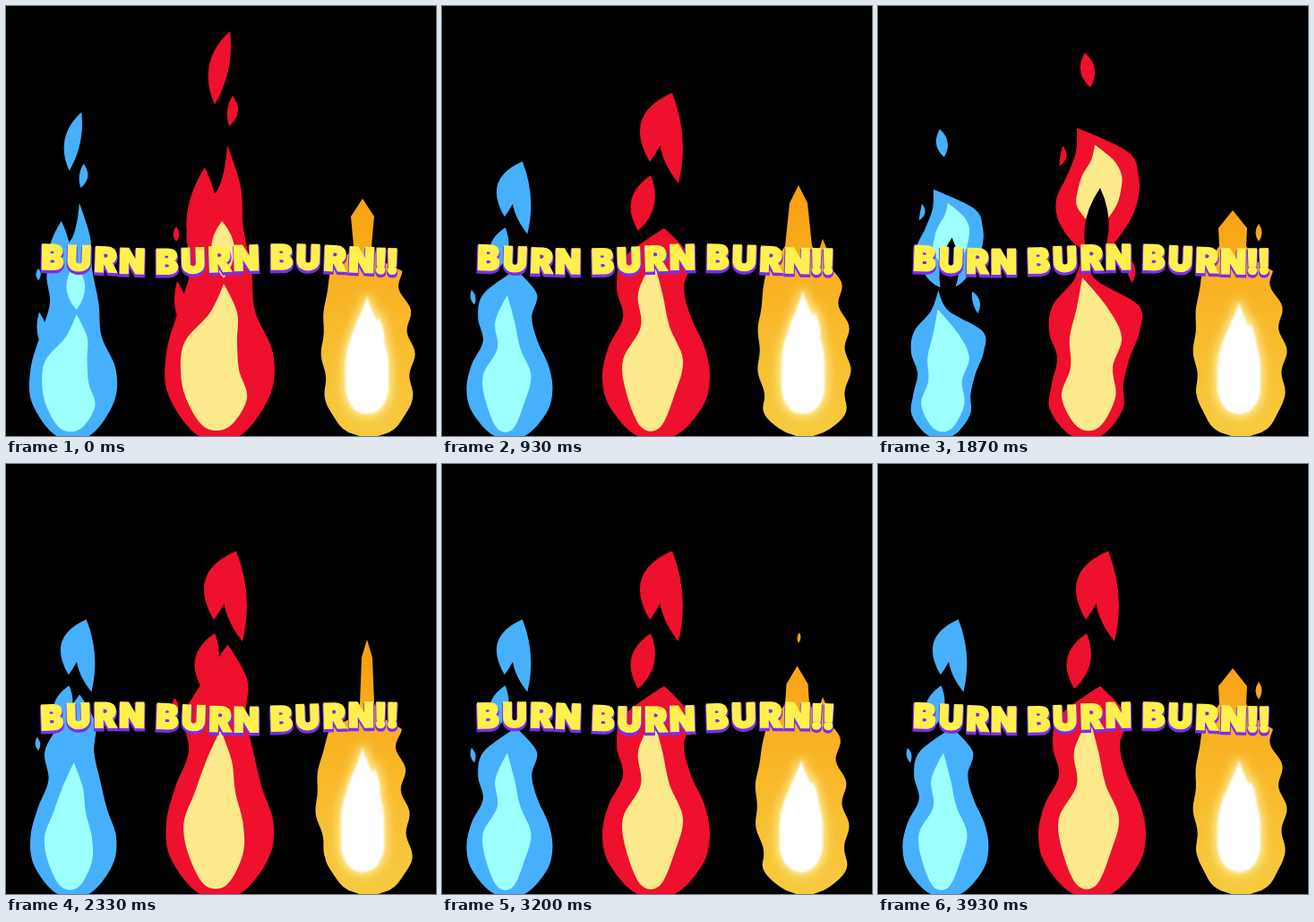
An HTML page that plays this animation: 480 by 480 pixels, repeating every 3.99 s.

```html
<!DOCTYPE html>
<html lang="en">
<head>
<meta charset="utf-8">
<title>Burn</title>
<style>
  html, body { margin: 0; width: 100%; height: 100%; overflow: hidden; background: #000; }
  svg { display: block; width: 100%; height: 100%; }
  text { font: 900 37px Inter, "Open Sans", sans-serif; text-anchor: middle; }
</style>
</head>
<body>
<svg viewBox="0 0 480 480">
  <defs>
    <linearGradient id="amber" gradientUnits="userSpaceOnUse" x1="0" y1="210" x2="0" y2="480">
      <stop offset="0" stop-color="#f8a012"/>
      <stop offset=".5" stop-color="#f9b829"/>
      <stop offset="1" stop-color="#f6cb40"/>
    </linearGradient>
    <filter id="soft" x="-50%" y="-50%" width="200%" height="200%">
      <feGaussianBlur stdDeviation="6"/>
    </filter>
    <filter id="edge"><feGaussianBlur stdDeviation="1.2"/></filter>
  </defs>
  <g transform="translate(-115.8 96) scale(.8)">
    <path class="outer" fill="#47b0fd"/><path class="core" fill="#9dfffe"/><path class="gap"/>
  </g>
  <g>
    <path class="outer" fill="#ee102c"/><path class="core" fill="#fce98b"/><path class="gap"/>
  </g>
  <path id="torch" fill="url(#amber)"/>
  <path class="heart" fill="#fff1a0" stroke="#fff1a0" stroke-width="6" filter="url(#soft)"/>
  <path class="heart" fill="#fff" filter="url(#edge)"/>
  <g id="words"></g>
</svg>
<script>
const NS = 'http://www.w3.org/2000/svg';
const FRAMES = 60, LOOP = 3990;

// Pointed lens from one end to the other; a positive bend bows it to the left.
function leaf([x1, y1, x2, y2, width, bend]) {
  const dx = x2 - x1, dy = y2 - y1, length = Math.hypot(dx, dy);
  const control = side => {
    const k = (2 * bend + side * width) / length;
    return `${(x1 + x2) / 2 - dy * k},${(y1 + y2) / 2 + dx * k}`;
  };
  return `M${x1},${y1}Q${control(-1)} ${x2},${y2}Q${control(1)} ${x1},${y1}Z`;
}

// Smooth flame: a tip, a base height and [left, right] edges evenly spaced between them.
function blob([x, y, base, ...edges]) {
  const rows = edges.length / 2, left = [], right = [];
  for (let i = 0; i < rows; i++) {
    const rowY = y + (base - y) * (i + 1) / (rows + 1);
    left.unshift([edges[2 * i], rowY]);
    right.push([edges[2 * i + 1], rowY]);
  }
  const l = left[0][0], r = right[rows - 1][0], inset = (r - l) * .3;
  const points = [[x, y], ...right, [r - inset, base], [l + inset, base], ...left];
  const at = i => points[(i + points.length) % points.length];
  const handle = (i, sign) => at(i).map((v, axis) =>
    at(i) === points[0] ? v : v + sign * (at(i + 1)[axis] - at(i - 1)[axis]) / 6);
  return `M${x},${y}` + points.map((_, i) =>
    `C${handle(i, 1)} ${handle(i + 1, -1)} ${at(i + 1)}`).join('') + 'Z';
}

const draw = part => part.length === 6 ? leaf(part) : blob(part);

// Shared parts meet in the middle, the rest come from the later pose.
const between = (a, b) => Object.fromEntries(Object.entries(b).map(([name, part]) =>
  [name, a[name] ? part.map((v, i) => (v + a[name][i]) / 2) : part]));

const tall = {
  body: [247, 155, 480, 238, 262, 203, 265, 206, 274, 192, 278, 179, 298, 181, 295],
  core: [243, 310, 470, 228, 258, 200, 258, 195, 260, 201, 269],
  coreBead: [241, 240, 243, 304, 26, 0],
  wisp: [250, 28, 233, 110, 22, 4],
  chip: [253, 100, 249, 134, 12, -2],
  fleck: [190, 246, 190, 263, 7, 0],
  tongue: [222, 180, 215, 300, 34, 0],
  lip: [191, 307, 200, 365, 14, 0]
};
const pinched = {
  body: [248, 248, 480, 203, 277, 195, 270, 202, 278, 186, 293, 179, 299, 187, 291],
  core: [236, 283, 470, 219, 246, 222, 254, 202, 269, 206, 260],
  crown: [257, 97, 264, 198, 26, 5],
  crownLobe: [257, 97, 232, 174, 30, 8],
  scrap: [233, 189, 219, 251, 26, 2],
  fleck: [186, 276, 190, 297, 7, 0]
};
const squat = {
  body: [229, 276, 480, 219, 243, 195, 291, 191, 292, 200, 281, 194, 274, 192, 273],
  core: [228, 303, 470, 222, 256, 214, 272, 215, 262, 205, 265],
  cloud: [222, 136, 270, 221, 279, 211, 291, 199, 290, 203, 279],
  coreCloud: [242, 155, 240, 238, 263, 228, 272, 223, 271, 222, 266],
  gap: [248, 203, 240, 297, 27, 0],
  dot: [231, 52, 237, 91, 16, 0],
  chip: [276, 278, 284, 309, 10, -2],
  fleck: [206, 156, 202, 179, 7, -3]
};
const forked = {
  body: [224, 240, 480, 219, 247, 219, 269, 207, 290, 193, 291, 187, 284, 194, 287],
  core: [238, 298, 470, 231, 248, 217, 273, 206, 271, 208, 275],
  coreSpike: [267, 342, 262, 410, 18, -2],
  cloud: [249, 122, 224, 228, 248, 217, 270, 215, 280, 220, 273],
  coreCloud: [233, 153, 215, 237, 249, 238, 260, 234, 263, 233, 260],
  gap: [250, 181, 232, 246, 26, 0],
  dot: [225, 46, 228, 67, 9, 0],
  chip: [274, 264, 275, 288, 8, 0],
  fleck: [208, 300, 187, 357, 16, 8]
};
const rising = {
  body: [231, 203, 480, 227, 256, 200, 286, 210, 282, 202, 281, 193, 301, 188, 302],
  core: [243, 261, 470, 230, 256, 239, 253, 219, 271, 202, 279],
  wisp: [245, 85, 243, 181, 26, 6],
  chip: [260, 148, 266, 208, 13, -5],
  fleck: [186, 290, 189, 324, 9, 3],
  tongue: [262, 216, 258, 290, 24, -2],
  lip: [198, 335, 205, 385, 12, 0]
};
const flames = [tall, between(tall, pinched), pinched, between(pinched, squat),
  squat, forked, rising, between(rising, tall)];

// shape: tip x, tip y, spire half width, neck half width, lean, top of the white heart
const horn = [425, 260, 428, 345, 18, 0];
const single = { shape: [398, 215, 13, 10, 0, 323] };
const twin = { shape: [395, 236, 11, 17, 6, 337], horn, spark: [399, 188, 398, 200, 4, 0] };
const spear = { shape: [403, 196, 6, 8, 7, 315] };
const broad = { shape: [396, 228, 16, 15, 0, 330], spark: [425, 243, 425, 263, 7, 0] };
const hooked = { shape: [398, 200, 10, 15, 0, 317], horn };
const torches = [single, between(single, twin), twin, spear, broad, hooked, between(hooked, single)];

// Polygon around a centre line, from rows of [y, centre, half width].
const column = rows => 'M' + [
  ...rows.map(([y, x, half]) => [x + half, y]),
  ...rows.map(([y, x, half]) => [x - half, y]).reverse()
].join('L') + 'Z';

const rounded = (y, from, radius) => y < from ? 1 : Math.sqrt(Math.max(0, 1 - ((y - from) / radius) ** 2));

function torchBody([x, y, girth, neck, lean]) {
  const rows = [[y, x, 0], [y + 20, x, girth], [268, x, neck], [285, x, neck + 12]];
  for (let row = 296; row <= 480; row += 4) {
    const t = Math.min(1, (row - 290) / 150);
    const jag = 2.5 * Math.sin(row * .13 + y);
    rows.push([row, 400 + 5 * t - lean * Math.sin(Math.PI * t) + jag * (1 - t),
      (37 + 13 * Math.sin(.75 * Math.PI * t) + jag) * rounded(row, 440, 41)]);
  }
  return column(rows);
}

function torchHeart([, , , , lean, top]) {
  const x = 403 - lean * .7, rows = [];
  for (let row = top; row <= 456; row += 3) {
    const t = Math.min(1, (row - top) / (456 - top) / .6);
    rows.push([row, x, 24 * Math.sin(t * Math.PI / 2) ** 1.3 * rounded(row, 425, 31)]);
  }
  return column(rows) + leaf([x + 13, top + 24, x + 15, top + 75, 11, 0]);
}

const words = document.getElementById('words');
const letters = [];
function addLetter(char, x) {
  const g = document.createElementNS(NS, 'g');
  for (const [dy, color, weight] of [[2.5, '#7b2df2', 4.5], [0, '#fff04d', 2.6]]) {
    const text = document.createElementNS(NS, 'text');
    text.textContent = char;
    text.setAttribute('y', dy);
    text.setAttribute('fill', color);
    text.setAttribute('stroke', color);
    text.setAttribute('stroke-width', weight);
    g.append(text);
  }
  words.append(g);
  letters.push({ g, x });
}
for (const left of [38, 166, 294])
  [...'BURN'].forEach((char, i) => addLetter(char, left + 13.5 + 29.7 * i));
addLetter('!', 418);
addLetter('!', 431);

const setPath = (selector, d) =>
  document.querySelectorAll(selector).forEach(el => el.setAttribute('d', d));

const layerOf = name => /^(core|gap)/.exec(name)?.[0] ?? 'outer';

function drawFlame(flame) {
  for (const layer of ['outer', 'core', 'gap'])
    setPath('.' + layer, Object.keys(flame).filter(name => layerOf(name) === layer)
      .map(name => draw(flame[name])).join(''));
}

function drawTorch({ shape, ...leaves }) {
  setPath('#torch', torchBody(shape) + Object.values(leaves).map(leaf).join(''));
  setPath('.heart', torchHeart(shape));
}

const startOf = n => Math.round(n * 20 / 3) * 10;
function stepAt(time) {
  let n = Math.min(FRAMES - 1, Math.floor((time + 5) * .015));
  while (n && startOf(n) > time) n--;
  return n;
}

function render(n) {
  drawFlame(flames[Math.floor(n % 11 * 8 / 11)]);
  drawTorch(torches[Math.floor(n % 7.75 / 7.75 * 7)]);

  const trough = 172 + 280 * n / 15;
  for (const { g, x } of letters) {
    const angle = (x - trough) / 280 * 2 * Math.PI;
    const y = 296 + 2.6 * Math.cos(angle), tilt = -2 * Math.sin(angle);
    g.setAttribute('transform', `translate(${x} ${y.toFixed(2)}) rotate(${tilt.toFixed(2)})`);
  }
}

const began = performance.now();
let shown = -1;
function tick() {
  const n = stepAt((performance.now() - began) % LOOP);
  if (n !== shown) render(shown = n);
  requestAnimationFrame(tick);
}
tick();
</script>
</body>
</html>
```
